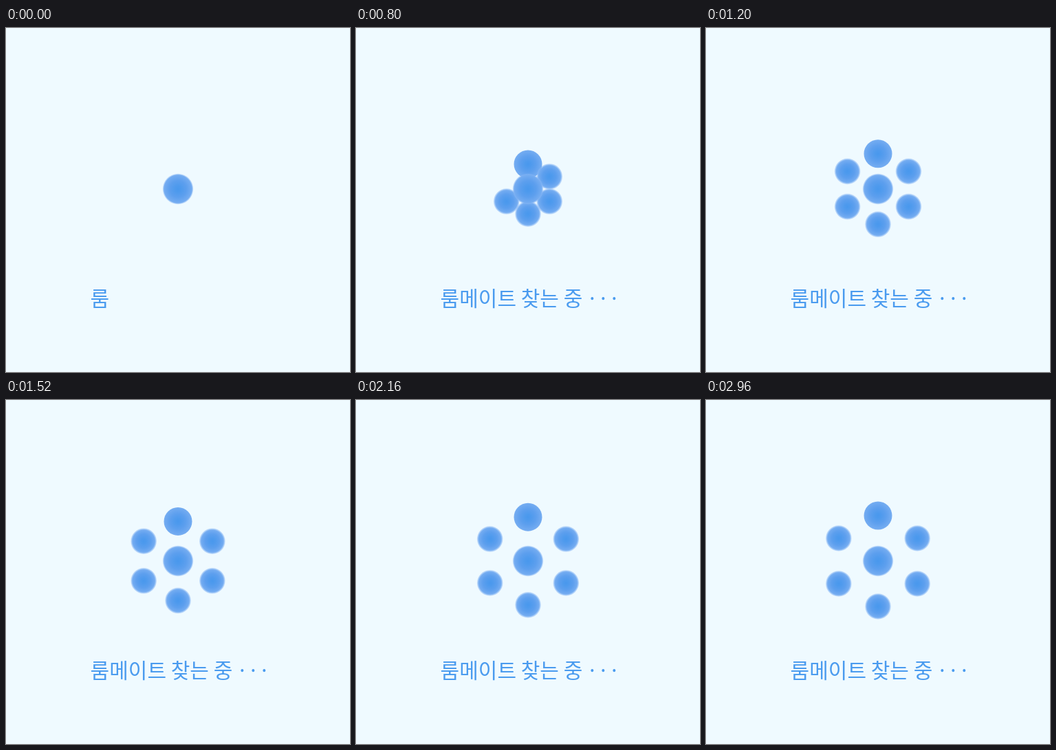
An HTML page with a canvas that plays this animation: 500 px wide and 500 px high, repeating every 3 s.

```html
<!DOCTYPE html>
<html lang="ko">
<head>
<meta charset="utf-8">
<title>룸메이트 찾는 중</title>
<style>
  html, body { margin: 0; width: 100%; height: 100%; overflow: hidden; background: #effaff; }
  canvas { display: block; width: 500px; height: 500px; }
</style>
</head>
<body>
<canvas id="stage" width="500" height="500"></canvas>
<script>
const ctx = document.getElementById('stage').getContext('2d');

const LOOP = 3000, STEP = 40;
const CX = 250, CY = 234, REACH = 66;
const POP = 1000 / 6;          // delay between satellites appearing
const TYPE = 2000 / 33;        // delay between typed glyphs
const LABEL = '룸메이트 찾는 중';
const DOTS = [343.5, 359.5, 375.5];
const FONT = '30px "Noto Sans CJK KR", "Noto Sans CJK JP", "Noto Sans CJK", sans-serif';

// cubic-bezier(1/3, 0, 0, 1), solved by bisection
function ease(x) {
  let lo = 0, hi = 1;
  for (let i = 0; i < 30; i++) {
    const s = (lo + hi) / 2;
    if (s * (1 - s) ** 2 + s ** 3 < x) lo = s; else hi = s;
  }
  return lo * lo * (3 - 2 * lo);
}

function ball(x, y, r, soft) {
  const g = ctx.createRadialGradient(x, y, 0, x, y, r);
  g.addColorStop(0, '#4998ed');
  g.addColorStop(0.2, '#4e9aed');
  g.addColorStop(0.55, '#5d9fee');
  g.addColorStop(1 - soft, '#74acf1');
  g.addColorStop(1, soft > 0.05 ? 'rgba(138,184,246,0.35)' : '#7aaff2');
  ctx.fillStyle = g;
  ctx.beginPath();
  ctx.arc(x, y, r, 0, Math.PI * 2);
  ctx.fill();
}

function drawBalls(t) {
  const d = REACH * ease(t / LOOP);
  for (let i = 0; i < 6; i++) {
    if (t < i * POP) break;
    const a = (i * 60 - 90) * Math.PI / 180;
    const x = CX + d * Math.cos(a), y = CY + d * Math.sin(a);
    if (i === 0) ball(x, y, 20.5, 0.03);
    else ball(x, y, 18.8, 0.14);
  }
  ball(CX, CY, 22.2, 0.1);
}

function drawLabel(t) {
  let left = 1 + Math.floor(t / TYPE);
  let text = '';
  for (const c of LABEL) {
    if (c !== ' ' && left-- <= 0) break;
    text += c;
  }
  ctx.font = FONT;
  ctx.fillStyle = '#4a9bef';
  ctx.textBaseline = 'alphabetic';
  ctx.textAlign = 'left';
  ctx.fillText(text, 122.6, 403.5);
  ctx.textAlign = 'center';
  DOTS.slice(0, Math.max(0, left)).forEach(x => ctx.fillText('·', x, 403.5));
}

function frame() {
  const t = Math.floor((performance.now() % LOOP) / STEP) * STEP;
  ctx.fillStyle = '#effaff';
  ctx.fillRect(0, 0, 500, 500);
  drawBalls(t);
  drawLabel(t);
  requestAnimationFrame(frame);
}
frame();
</script>
</body>
</html>
```
